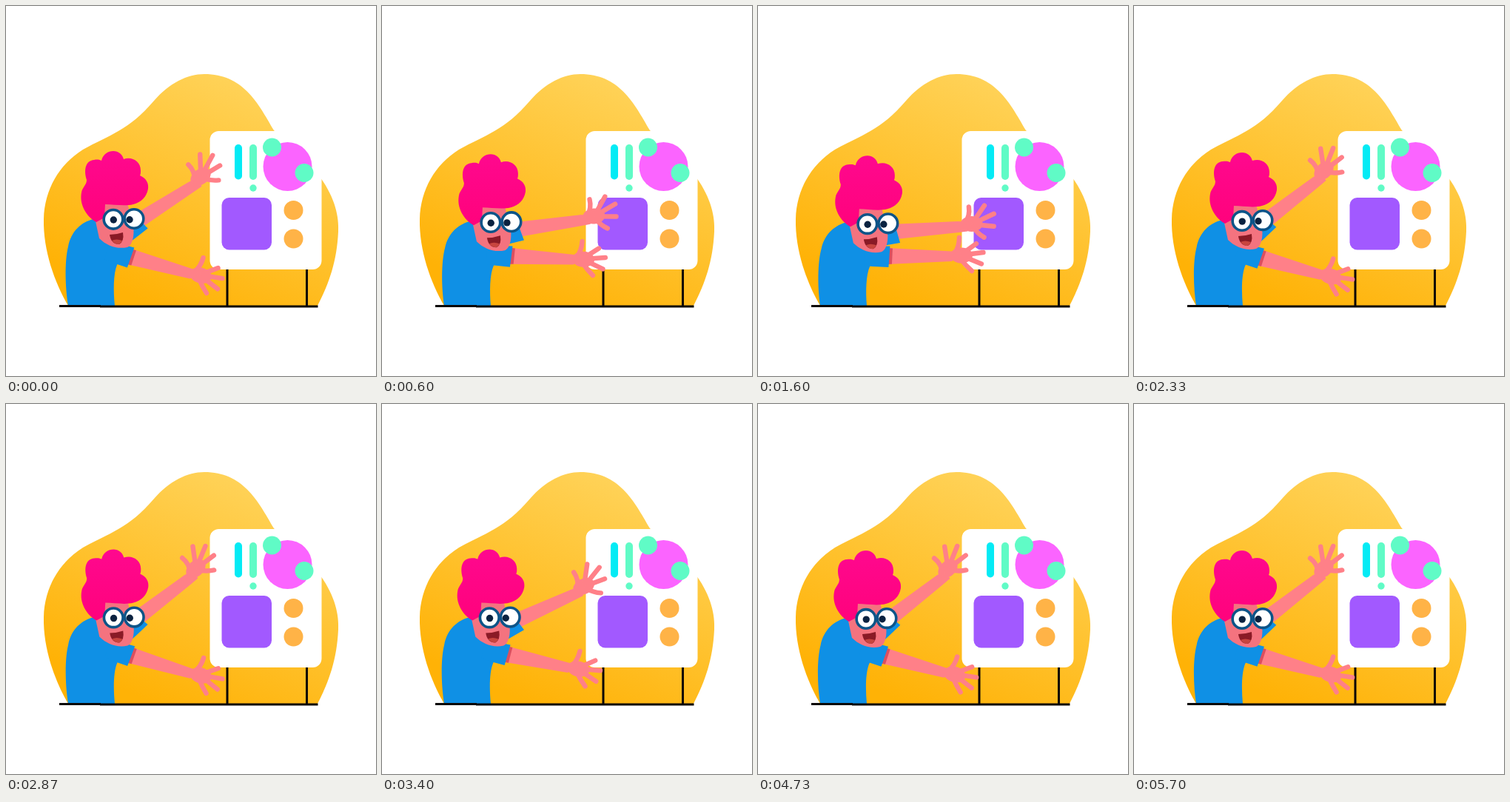
These frames come from a looping animation (500 by 500 pixels, 5.73 s). An HTML page:

```html
<!DOCTYPE html>
<html lang="en">
<head>
<meta charset="utf-8">
<title>Reaching for the board</title>
<style>
  html, body { margin: 0; width: 100%; height: 100%; overflow: hidden; background: #fff; }
  svg { display: block; width: 100vw; height: 100vh; }
  .skin { fill: #ff8088; }
  .shirt { fill: #0f90e5; }
  .fingers { fill: none; stroke: #ff8088; stroke-width: 6.4; stroke-linecap: round; stroke-linejoin: round; }
  .ink { fill: none; stroke: #0a0606; stroke-width: 3; }
  .mint { fill: #60fbc6; }
  .amber { fill: #ffb347; }
</style>
</head>
<body>
<svg viewBox="0 0 500 500">
  <defs>
    <linearGradient id="sun" gradientUnits="userSpaceOnUse" x1="320" y1="95" x2="190" y2="400">
      <stop offset="0" stop-color="#ffd35a"/>
      <stop offset="1" stop-color="#ffb206"/>
    </linearGradient>
    <linearGradient id="hair" x1="0" y1="0" x2="0" y2="1">
      <stop offset="0" stop-color="#ff088e"/>
      <stop offset="1" stop-color="#ff027c"/>
    </linearGradient>
  </defs>

  <path fill="url(#sun)" d="M84 405C66 374 50 330 51 288C52 248 72 214 104 194C140 174 166 168 200 128C221 104 245 92 268 92C320 92 340 130 362 168L425 232C445 260 450 285 449 305C447 345 437 374 421 405Z"/>

  <path class="ink" d="M299 354V405M406.500 354V405"/>
  <rect x="275.500" y="169" width="151" height="187" rx="12" fill="#fff"/>
  <rect x="309" y="187" width="10" height="47.500" rx="5" fill="#04ebf5"/>
  <rect class="mint" x="329" y="187" width="10" height="48" rx="5"/>
  <circle class="mint" cx="334" cy="246" r="4.700"/>
  <circle cx="380.500" cy="217" r="33" fill="#fb64ff"/>
  <circle class="mint" cx="359.500" cy="191" r="12.500"/>
  <circle class="mint" cx="403" cy="225.500" r="12.500"/>
  <rect x="291.500" y="259" width="67.500" height="70.500" rx="10" fill="#a259ff"/>
  <circle class="amber" cx="388.500" cy="276" r="13"/>
  <circle class="amber" cx="388.500" cy="314.500" r="13"/>

  <g id="farArm">
    <path class="skin" d="M10-10.500L28-10.500L108-7.500L120-6V7L108 7.500L28 9.500H10Z"/>
    <g id="farHand">
      <ellipse class="skin" cx="15" cy="-4" rx="15" ry="10.500"/>
      <path class="fingers" d="M6-5Q13-15 11-27M18-8L32-29M22-7L45-18M22-3L45-1M17 0Q23 9 32 14"/>
    </g>
    <path class="shirt" d="M-8-10L23-9L28 15L6 17L-8 18Z"/>
  </g>

  <path id="torso" class="shirt" d="M84 405C80 380 79 345 84 325C88 304 102 292 118 288L150 305L160 330L150 350C145 362 145 385 147 405Z"/>

  <g id="nearArm">
    <path class="skin" d="M17-11L104-6.500L112 0L104 7L17 11Z"/>
    <path fill="#dc4f5e" d="M17-11L24-10.600L23 10.800L17 11Z"/>
    <ellipse class="skin" cx="117" cy="-1" rx="15" ry="10.500"/>
    <path class="fingers" d="M108-4Q114-13 114-25M119-4L137-17M122-2L146.500-5M121 1L144 10.500M115 3Q123 13 131 20"/>
    <path class="shirt" d="M-14-13L20.500-13.500L18.500 15L-3 14L-14 13Z"/>
  </g>

  <g id="head">
    <path fill="#f4737f" d="M133 262H165V270L172 298C174 312 170 324 164 326C150 329 136 324 126 314L121 291Z"/>
    <path fill="url(#hair)" d="M122 292C108 284 99 268 102 252C103 245 109 242 109 235C105 222 107 209 119 208C124 207 127 208 129 209C131 200 138 196 145 196C152 196 157 200 159 207C170 203 182 210 182 222C182 225 182 227 181 229C190 233 193 240 192 247C190 258 183 265 172 268C160 271 146 268 134 268L133 286Z"/>
    <g fill="#fff" stroke="#0d5488" stroke-width="3.600">
      <circle cx="145" cy="288.300" r="12.800"/>
      <circle cx="173" cy="287.500" r="12.800"/>
    </g>
    <g fill="#0a2240">
      <circle cx="145.300" cy="289" r="4.700"/>
      <circle cx="167" cy="288.700" r="4.700"/>
    </g>
    <path fill="#8a1a26" d="M140 309Q149 309 158 306Q160 318 153 322Q142 322 140 309Z"/>
    <path fill="#c8453f" d="M143 317Q149 314 157 317Q155 322 151 322Q146 321 143 317Z"/>
  </g>

  <path class="ink" d="M72 405.500H128M127 406H421.500"/>
</svg>
<script>
  const LOOP = 5730, TICK = 100 / 3, CYCLE = 12;
  const part = id => document.getElementById(id);
  const [farArm, farHand, torso, head, nearArm] =
    ['farArm', 'farHand', 'torso', 'head', 'nearArm'].map(part);
  const put = (el, value) => el.setAttribute('transform', value);
  const swing = (step, peak) => Math.cos(2 * Math.PI * (step - peak) / CYCLE);

  // 25 poses a second shown at 30 ticks a second, with ticks on 10 ms marks
  function stepAt(t) {
    let tick = Math.floor(t / TICK + 0.2);
    if (Math.round(tick * TICK / 10) * 10 > t) tick--;
    return Math.floor(tick * 5 / 6);
  }

  function pose(step) {
    const sink = 1 - swing(step, 0);
    const far = swing(step, 10.4);
    const near = swing(step, 11);
    const farAngle = -21.4 - 17.2 * far;
    const handAngle = -21 - 22 * far;

    put(head, `translate(${1.9 * sink} ${4.2 * sink})`);
    put(torso, `translate(0 405) matrix(1 0 ${-0.014 * sink} ${1 - 0.023 * sink} 0 0) translate(0 -405)`);
    put(farArm, `translate(${160 + 2 * sink} ${303 + 2.8 * sink}) rotate(${farAngle})`);
    put(farHand, `translate(111 0) rotate(${handAngle - farAngle})`);
    put(nearArm, `translate(${150 + 5.3 * sink} ${334 + 2.7 * sink}) rotate(${7.7 + 8.9 * near})`);
  }

  const start = performance.now();
  function draw() {
    pose(stepAt((performance.now() - start) % LOOP));
    requestAnimationFrame(draw);
  }
  draw();
</script>
</body>
</html>
```
